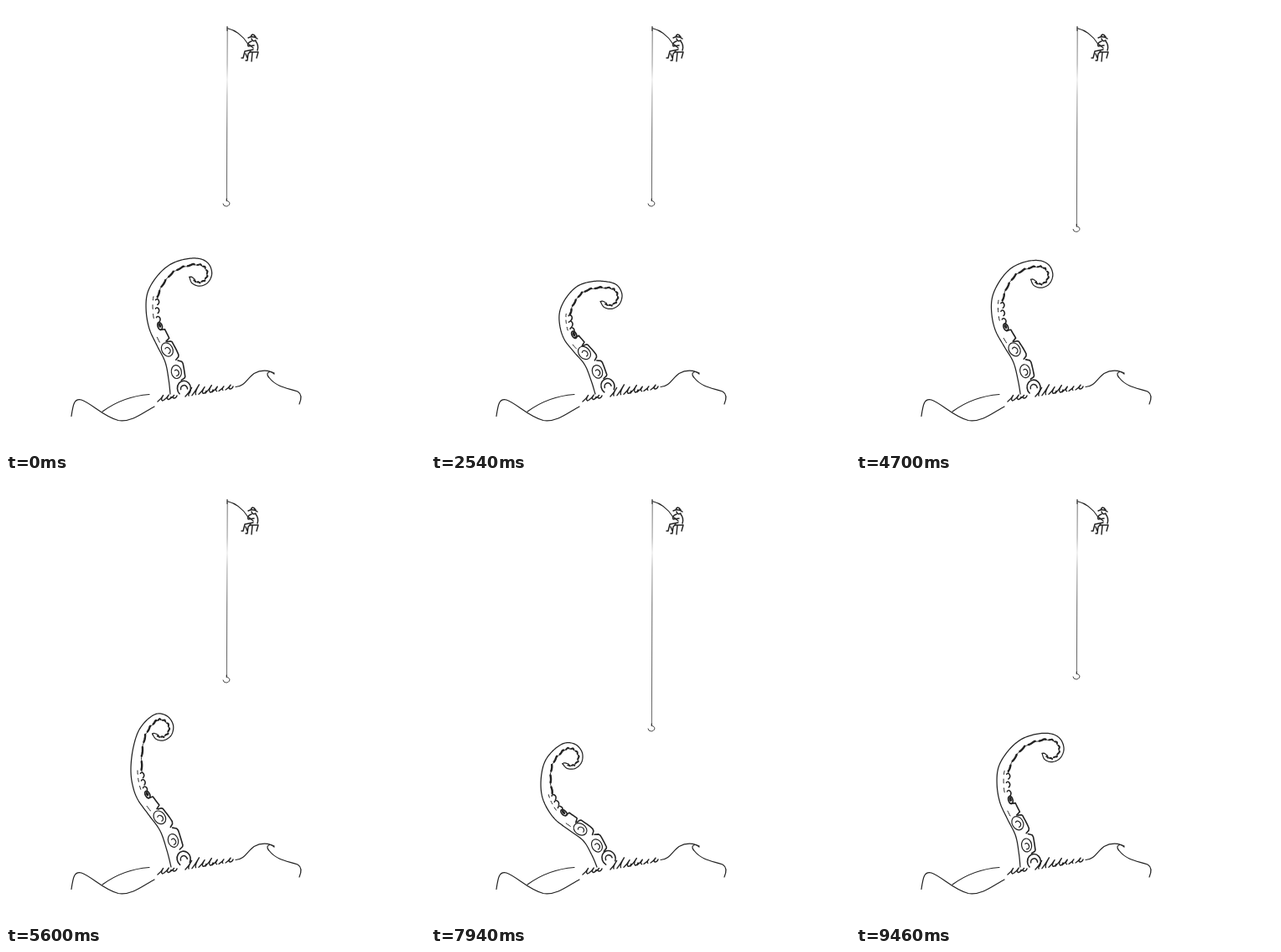
Recreate the animation shown at these times as an HTML page with a canvas. Size 500 by 531 pixels, loop 9480 ms.

```html
<!DOCTYPE html>
<html lang="en">
<head>
<meta charset="utf-8">
<title>Fishing above the tentacle</title>
<style>
  html, body { margin: 0; width: 100%; height: 100%; overflow: hidden; background: #fff; }
  canvas { display: block; width: 500px; height: 531px; }
</style>
</head>
<body>
<canvas id="stage"></canvas>
<script>
const LOOP = 9480, INK = '#222', RAD = Math.PI / 180;
const canvas = document.getElementById('stage');
const ctx = canvas.getContext('2d');
const dpr = window.devicePixelRatio || 1;
canvas.width = 500 * dpr;
canvas.height = 531 * dpr;

const lerp = (a, b, w) => a + (b - a) * w;
const mix = (a, b, w) => a.map((p, i) => p.map((v, k) => lerp(v, b[i][k], w)));

// Outer edge: a few points from the water to the crown, then a spiral
function makePose(text, tilt) {
  const keys = text.split(' ').map(p => p.split(',').map(Number));
  const crown = keys[keys.length - 1];
  const spiral = k => {
    const a = (tilt + 40 * k) * RAD, r = 18.5 - .24 * k * k;
    return [
      crown[0] - 18.5 * Math.cos(tilt * RAD) + r * Math.cos(a),
      crown[1] - 18.5 * Math.sin(tilt * RAD) + r * Math.sin(a)
    ];
  };
  const guide = [keys[0], ...keys, spiral(2)], pose = [];
  for (let i = 1; i < keys.length; i++) {
    const [a, b, c, d] = guide.slice(i - 1, i + 3);
    pose.push(b, b.map((v, k) => (9 * (v + c[k]) - a[k] - d[k]) / 16));
  }
  for (let k = 0; k <= 6; k++) pose.push(spiral(k));
  return pose;
}

const reach = makePose('196,463 190,425 171,385 169,342 195,309 231,301.5', -81);
const duck = makePose('196,463 184,428 160,397 155,362 177,332 212,327', -90);
const tall = makePose('197,463 184,420 157,382 149,345 158,301 181,280', -95);
const back = makePose('198,463 182,432 149,407 132,376 136,337 160,315', -103);
const lean = mix(mix(reach, tall, .2), duck, .22);
const settle = reach.map(([x, y], i) => [x + i * .2, y + i * .25]);

const poseKeys = [
  [0, reach], [1180, duck], [1700, mix(reach, duck, 1.4)], [2540, mix(reach, duck, 1.08)],
  [2950, lean], [4750, lean], [5200, mix(lean, tall, 1.3)], [5600, tall],
  [7940, back], [8660, reach], [9460, settle]
];
const hookKeys = [[0, 235], [1180, 303.5], [2540, 235], [3700, 296.5], [5600, 239], [7940, 297], [9460, 235]];
const rodDip = t => 4 * Math.exp(-(((t - 1180) / 260) ** 2));

function track(keys, t, blend) {
  let i = 1;
  while (i < keys.length - 1 && keys[i][0] < t) i++;
  const [t0, a] = keys[i - 1], [t1, b] = keys[i];
  const k = Math.min(1, (t - t0) / (t1 - t0));
  return blend(a, b, k * k * (3 - 2 * k));
}

// Maps station u and inward offset n to the stage
function bodyMap(pose) {
  const last = pose.length - 1;
  const at = i => pose[Math.min(last, Math.max(0, i))];
  return (u, n) => {
    const i = Math.min(last - 1, Math.floor(u)), f = u - i;
    const p = [at(i - 1), at(i), at(i + 1), at(i + 2)];
    const curve = k => {
      const [a, b, c, d] = p.map(q => q[k]);
      const c1 = c - a, c2 = 2 * a - 5 * b + 4 * c - d, c3 = 3 * b - a - 3 * c + d;
      return [b + .5 * f * (c1 + f * (c2 + f * c3)), .5 * (c1 + f * (2 * c2 + 3 * f * c3))];
    };
    const [x, dx] = curve(0), [y, dy] = curve(1), len = Math.hypot(dx, dy) || 1;
    return { x: x - dy / len * n, y: y + dx / len * n, angle: Math.atan2(dy, dx) };
  };
}

function stroke(d, width, color = INK) {
  ctx.lineWidth = width;
  ctx.strokeStyle = color;
  ctx.stroke(d instanceof Path2D ? d : new Path2D(d));
}

function trace(at, from, to, offset) {
  const path = new Path2D(), steps = Math.ceil((to - from) * 12);
  for (let i = 0; i <= steps; i++) {
    const u = lerp(from, to, i / steps), p = at(u, offset(u));
    path.lineTo(p.x, p.y);
  }
  return path;
}

function oval(at, u, n, rx, ry, width, from = 0, to = 2 * Math.PI) {
  const p = at(u, n), path = new Path2D();
  path.ellipse(p.x, p.y, rx, ry, p.angle, from, to);
  stroke(path, width);
}

function sucker(at, u, n, rx, ry) {
  oval(at, u, n, rx, ry, 1.2);
  oval(at, u - .05, n, rx * .45, ry * .45, 1.2, -.6, 3.4);
}

const innerEdge = u => 4 + 9 * ((16 - u) / 10) ** 2 + Math.abs(Math.sin(u * 4.3)) * 1.3 - .6;
// Square-shouldered bumps beside the large suckers
const shoulder = (u, from, to, n) => n + 5 * Math.min(1, 3.2 * Math.sin(Math.PI * (u - from) / (to - from)));

function drawTentacle(pose) {
  const at = bodyMap(pose);
  stroke(trace(at, 0, 16, () => 0), 1.25);
  stroke(trace(at, 15.3, 16, u => 5.5 * Math.sqrt((16 - u) / .7)), 1.2);

  oval(at, .4, 17, 9, 8, 1.6, -2.3, 2.3);
  oval(at, .35, 17, 4.5, 4, 1.5, -1.6, 1.6);
  sucker(at, 1.4, 10.5, 8, 6);
  sucker(at, 2.55, 8.5, 8.5, 6.5);

  for (const [from, to, n] of [[.9, 1.9, 15], [1.95, 2.95, 13], [3, 3.7, 12]]) {
    stroke(trace(at, from, to, u => shoulder(u, from, to, n)), 1.6);
  }

  // Small cups towards the thinner part
  oval(at, 3.95, 13, 4.5, 2.6, 1.7);
  oval(at, 4, 13, 2, .8, 1.5);
  for (let u = 4.4; u < 5.8; u += .55) {
    oval(at, u, 13, 3.4, 2.4, 1.5, -.8, 2.8);
    stroke(trace(at, u + .1, u + .35, () => 8), 1);
  }
  stroke(trace(at, 3.1, 3.4, () => 4.5), 1);

  // Ragged inner edge of the curl
  stroke(trace(at, 5.7, 15.3, innerEdge), .9);
  for (let u = 5.9; u < 15; u += .8) {
    stroke(trace(at, u, u + .5, v => innerEdge(v) - .3), u < 9.5 ? 2.4 : 2);
  }
}

function seeded(seed) {
  return () => (seed = seed * 16807 % 2147483647) / 2147483647;
}

// Slanted handwriting-like splashes that shrink along the line
function splash(x0, x1, base, rise, tall, low, seed) {
  const rnd = seeded(seed), path = new Path2D(), count = Math.round((x1 - x0) / 7.5);
  for (let i = 0; i < count; i++) {
    const f = i / (count - 1), x = lerp(x0, x1 - 8, f), y = base - rise * f;
    const h = lerp(tall, low, f) * (.75 + .5 * rnd());
    path.moveTo(x, y);
    path.quadraticCurveTo(x + 4, y - h * .4, x + 4 + h * .35, y - h);
    path.quadraticCurveTo(x + 3, y - h * .3, x + 4 + 2 * rnd(), y - 1);
    if (rnd() > .4) path.quadraticCurveTo(x + 8, y - 1, x + 9, y - 4);
  }
  return path;
}
const sprays = [splash(181, 203, 472, 3, 10, 5, 7), splash(214, 270, 466, 8, 14, 5, 23)];

const sea = [
  'M78 489.500C80 476 81 468 90 470C102 474 116 490 134 494.500C150 497 164 485 177 478',
  'M115 484C130 473 150 465 171 463.500',
  'M274 454.500C285 454 288 444 296 438.500C304 434 314 434 320 439',
  'M320 438C314 434.500 309 438 314 443.500C324 456 338 456 348 460C353 463 353 468 350 475'
];
const angler = [
  'M289 38Q295 35 300 39M292 37Q294 31 298 37M293 39Q294 43 298 41',
  'M293 42Q287 44 289 48L296 47M298 42Q302 47 300 53M290 46L295 50',
  'M295 52L285 54L283 62H281M292 54L289 57L288 65H286M286 57L288 62',
  'M291 55H301M294 55L293 66M301 55L299 62'
];

function drawFishing(hook, dip) {
  const tip = 26 + dip;
  stroke(`M264 ${tip - 1.5}v5M264 ${tip + .5}Q279 ${tip + 4} 288.500 45`, 1.15);

  // The line is worn thin a little below the rod
  const fade = ctx.createLinearGradient(0, tip, 0, 150);
  fade.addColorStop(0, '#555');
  fade.addColorStop(.35, '#888');
  fade.addColorStop(.5, '#e4e4e4');
  fade.addColorStop(.65, '#999');
  fade.addColorStop(1, '#555');
  stroke(`M264.200 ${tip}L263.400 ${hook - 4}`, .9, fade);
  stroke(`M263.300 ${hook - 5}v2.500`, 1.1);
  stroke(`M263.300 ${hook - 2.5}C269 ${hook - 2} 267.500 ${hook + 4} 262.500 ${hook + 4}Q259 ${hook + 3.5} 259 ${hook + 1}`, 1, '#444');
}

function draw(t) {
  ctx.setTransform(dpr, 0, 0, dpr, 0, 0);
  ctx.fillStyle = '#fff';
  ctx.fillRect(0, 0, 500, 531);
  ctx.lineCap = ctx.lineJoin = 'round';
  sea.forEach(d => stroke(d, 1.2));
  drawTentacle(track(poseKeys, t, mix));
  sprays.forEach(d => stroke(d, 1.4));
  drawFishing(track(hookKeys, t, lerp), rodDip(t));
  angler.forEach(d => stroke(d, 1.45));
}

const start = performance.now();
function frame() {
  draw((performance.now() - start) % LOOP);
  requestAnimationFrame(frame);
}
frame();
</script>
</body>
</html>
```
